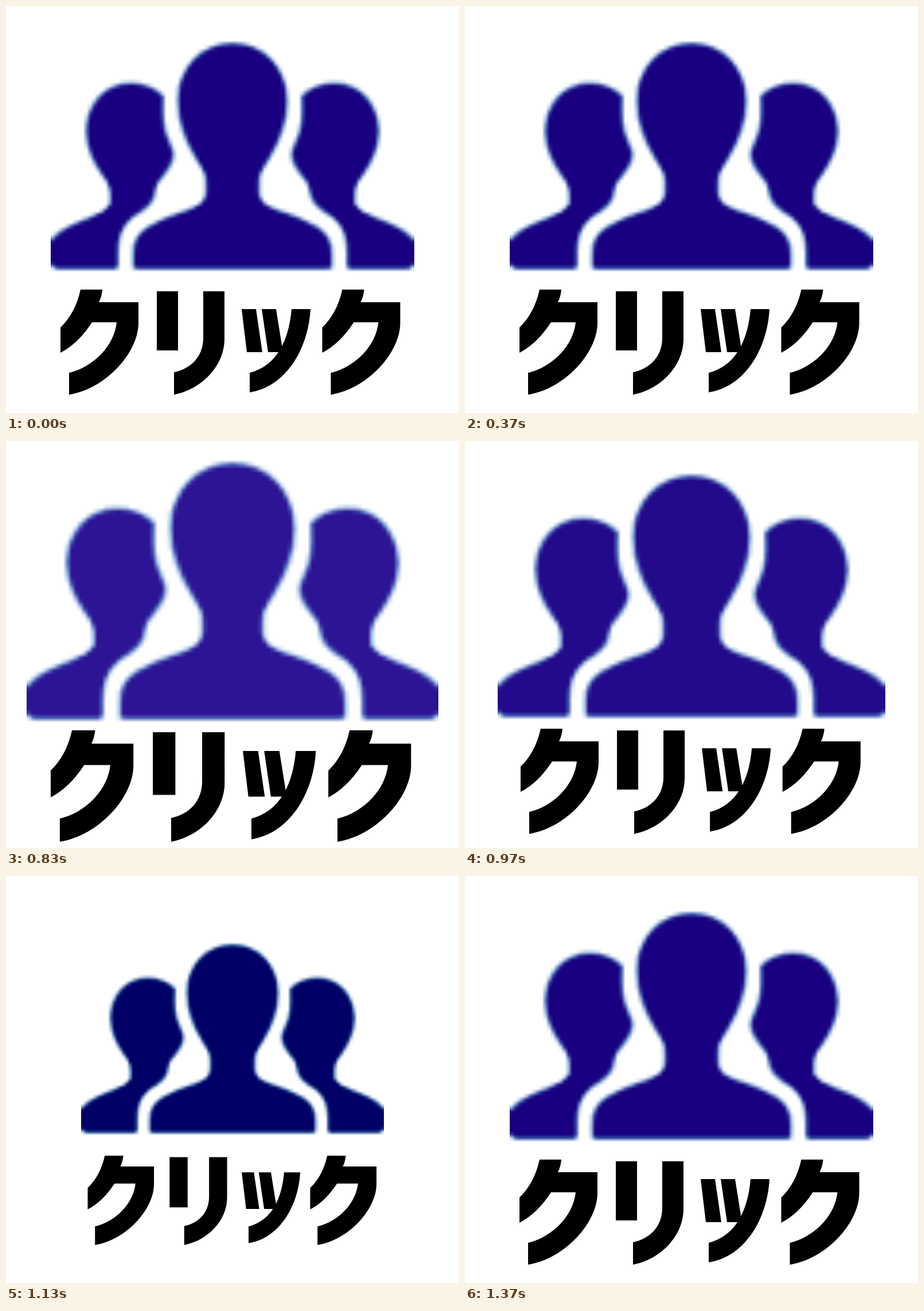
Write an HTML page with a canvas that moves like this. It is 790 px wide and 709 px high and loops after 2000 ms.

```html
<!DOCTYPE html>
<html lang="ja">
<head>
<meta charset="utf-8">
<title>クリック</title>
<style>
  html, body { margin: 0; width: 100%; height: 100%; overflow: hidden; background: #fff; }
  canvas { display: block; width: 790px; height: 709px; }
</style>
</head>
<body>
<canvas id="stage" width="790" height="709" role="img" aria-label="クリック"></canvas>
<script>
const ctx = document.getElementById('stage').getContext('2d');

// The icon is drawn on a coarse grid and enlarged, which gives its soft stepped edge.
const COLS = 96, ROWS = 64, CELL = 634 / COLS;
const BOX = { x: 78, y: 50, w: 634, h: ROWS * CELL };
const grid = document.createElement('canvas');
grid.width = COLS;
grid.height = ROWS;
const gctx = grid.getContext('2d');

const middle = new Path2D(
  'M395 63C338 63 298 108 298 165C298 205 312 235 327 262C338 282 347 290 347 306V326' +
  'C346 342 334 347 316 354C290 363 268 370 246 384C227 396 220 412 220 432V452Q220 460 228 460' +
  'H562Q570 460 570 452V432C570 412 563 396 544 384C522 370 500 363 474 354' +
  'C456 347 444 342 443 326V306C443 290 452 282 463 262C478 235 492 205 492 165C492 108 452 63 395 63Z');
const side = new Path2D(
  'M218 132C170 132 138 171 138 219C138 250 152 275 165 293C176 307 180 313 180 326V344' +
  'C172 357 160 361 145 367C116 377 95 387 80 404L60 422V440L88 460H190Q197 460 197 450V430' +
  'C197 405 203 385 220 371C236 358 256 350 260 332C264 312 262 310 275 297' +
  'C286 285 293 272 294 258C291 242 283 232 279 215C274 198 276 180 276 156C262 141 240 132 218 132Z');
const people = new Path2D(middle);
people.addPath(side);
people.addPath(side, new DOMMatrix([-1, 0, 0, 1, 790, 0]));

const ku = new Path2D(
  'M130 494H168Q167 506 162 516H231V552C231 604 174 667 110 677V639' +
  'C155 628 189 590 193 551H150Q126 588 95 604V560Q121 535 130 494Z');
const ri = new Path2D('M263 497H300V600H263ZM344 497H381V580C381 627 341 668 293 677V638C323 632 344 610 344 578Z');
const tsu = new Path2D(
  'M411 528H436L447 603H420ZM446 528H471L483 603H457Z' +
  'M498 528H531C527 600 486 664 425 673V639C471 627 493 585 498 528Z');
const word = new Path2D(ku);
word.addPath(ri);
word.addPath(tsu);
word.addPath(ku, new DOMMatrix().translate(456.5, 0));

// Linear keys, six ticks apart: icon scale, icon y, light, word scale, word x, word y
const LOOP = 2000, START = 21, SPAN = 6;
const KEYS = [
  [1, 0, 0, 1, 0, 0],
  [1.2, 0, 30, 1.091, 1.4, 23.3],
  [0.8, 26.4, -30, 0.82, 3.6, -24.6],
  [1, 0, 0, 1, 0, 0]
];

// Thirty ticks a second, each starting on a whole hundredth
const tickAt = ms => Math.floor((Math.floor(ms / 10) * 10 + 5) * 0.03);

function poseAt(ms) {
  const p = Math.min(Math.max((tickAt(ms) - START) / SPAN, 0), KEYS.length - 1);
  const i = Math.min(Math.floor(p), KEYS.length - 2);
  return KEYS[i].map((v, n) => v + (KEYS[i + 1][n] - v) * (p - i));
}

function place(cx, cy, scale, dx, dy) {
  ctx.setTransform(scale, 0, 0, scale, cx + dx - cx * scale, cy + dy - cy * scale);
}

function paintGrid(light) {
  const tint = (...rgb) => `rgb(${rgb.map(v => Math.max(0, Math.round(v + light)))})`;
  gctx.setTransform(1, 0, 0, 1, 0, 0);
  gctx.clearRect(0, 0, COLS, ROWS);
  gctx.setTransform(1 / CELL, 0, 0, 1 / CELL, -BOX.x / CELL, -BOX.y / CELL);
  gctx.globalCompositeOperation = 'source-over';
  gctx.fillStyle = tint(24, 0, 128);
  gctx.fill(people);
  // Pale rim, kept inside the shape
  gctx.globalCompositeOperation = 'source-atop';
  gctx.strokeStyle = tint(75, 140, 195);
  gctx.lineWidth = 7;
  gctx.stroke(people);
}

function draw(ms) {
  const [iconScale, iconY, light, wordScale, wordX, wordY] = poseAt(ms);
  ctx.setTransform(1, 0, 0, 1, 0, 0);
  ctx.fillStyle = '#fff';
  ctx.fillRect(0, 0, 790, 709);

  paintGrid(light);
  place(395, 261.5, iconScale, 0, iconY);
  ctx.drawImage(grid, BOX.x, BOX.y, BOX.w, BOX.h);

  place(391.5, 585.5, wordScale, wordX, wordY);
  ctx.fillStyle = '#000';
  ctx.fill(word);
}

const began = performance.now();
function loop() {
  draw((performance.now() - began) % LOOP);
  requestAnimationFrame(loop);
}
loop();
</script>
</body>
</html>
```
